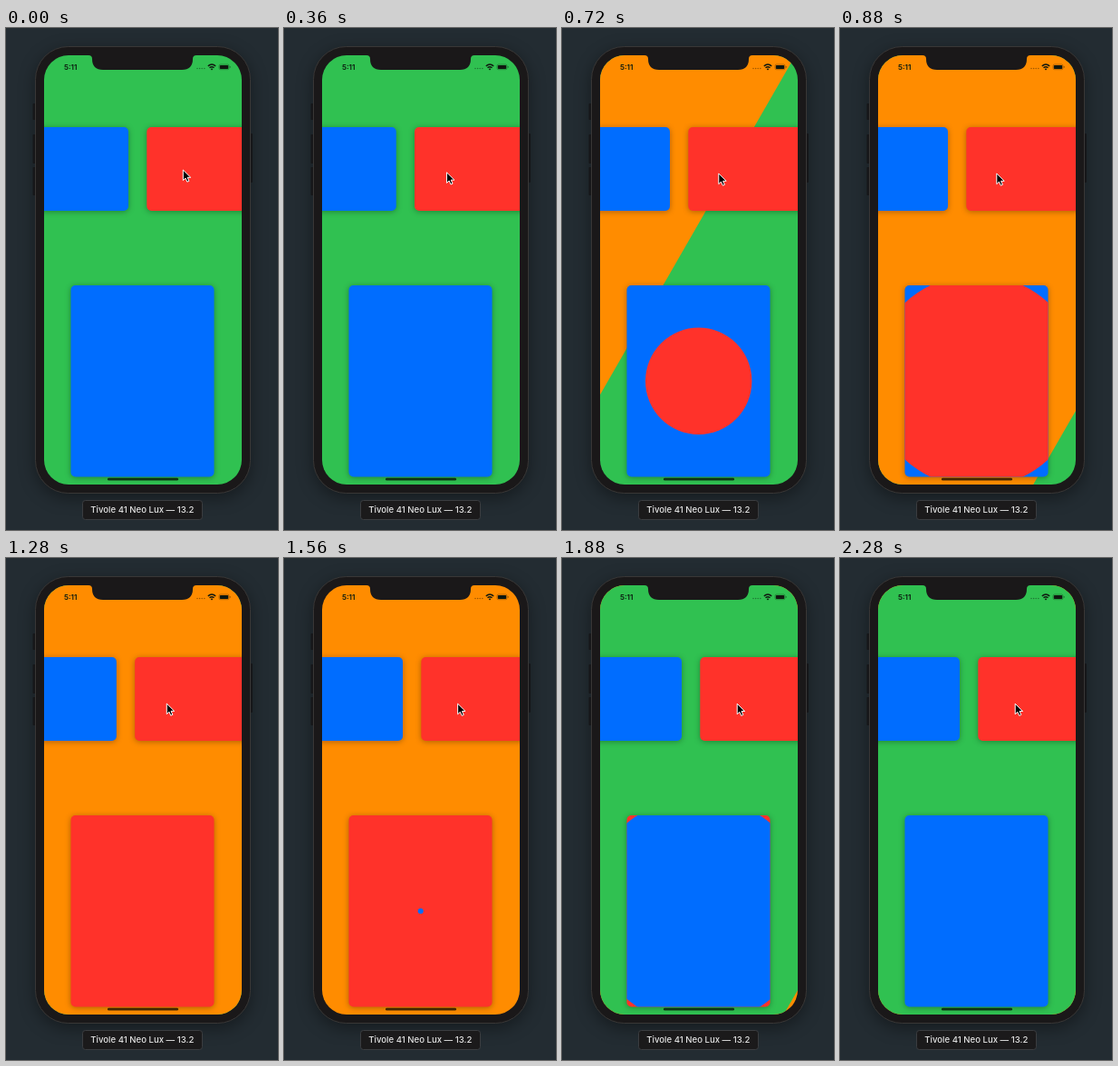
An HTML page that plays this animation: 300 px wide and 552 px high, repeating every 2.32 s.

```html
<!DOCTYPE html>
<html lang="en">
<head>
<meta charset="utf-8">
<title>Card transition</title>
<style>
  html, body { margin: 0; width: 100%; height: 100%; overflow: hidden; background: #232c32; }
  svg { display: block; width: 100%; height: 100%; }
  text { font-family: Inter, "Open Sans", sans-serif; }
  .phone { filter: drop-shadow(0 5px 9px rgba(0, 0, 0, .38)); }
  .card { filter: drop-shadow(0 1px 3px rgba(0, 0, 0, .32)); }
</style>
</head>
<body>
<svg viewBox="0 0 300 552">
  <defs>
    <clipPath id="screen"><rect x="42" y="30" width="218" height="472" rx="27"/></clipPath>
    <clipPath id="panel"><rect x="71.5" y="283" width="158" height="210.5" rx="5"/></clipPath>
  </defs>
  <rect width="300" height="552" fill="#232c32"/>

  <g fill="#1b1c1f">
    <rect x="29.5" y="83" width="5" height="18" rx="1"/>
    <rect x="29.5" y="117" width="5" height="32" rx="1"/>
    <rect x="29.5" y="153" width="5" height="31" rx="1"/>
    <rect x="267" y="116" width="5" height="54" rx="1"/>
  </g>
  <rect class="phone" x="32.5" y="20.5" width="237" height="491" rx="36" fill="#1a1819" stroke="#393736"/>

  <g clip-path="url(#screen)">
    <rect id="back" x="42" y="30" width="218" height="472"/>
    <path id="wipe"/>
    <g id="row">
      <rect class="card" x="-158" y="109" width="158" height="92" rx="5" fill="#006dff"/>
      <rect class="card" x="20.3" y="109" width="158" height="92" rx="5" fill="#ff322a"/>
    </g>
    <rect id="base" class="card" x="71.5" y="283" width="158" height="210.5" rx="5"/>
    <g clip-path="url(#panel)"><circle id="dot" cx="150.7" cy="388.3"/></g>
    <rect x="112" y="494.8" width="78" height="2.7" rx="1.35" fill="#000" fill-opacity=".7"/>

    <path d="M91 29V30Q95 30 95 34Q95 46 107 46H194Q206 46 206 34Q206 30 210 30V29Z" fill="#1a1819"/>
    <text x="64" y="45.6" font-size="8.2" font-weight="600" fill="#0b1a0e">5:11</text>
    <g fill="#000" fill-opacity=".4">
      <circle cx="211" cy="44.5" r=".75"/><circle cx="213.6" cy="44.5" r=".75"/>
      <circle cx="216.2" cy="44.5" r=".75"/><circle cx="218.8" cy="44.5" r=".75"/>
    </g>
    <g fill="none" stroke="#101810" stroke-width="1.4">
      <path d="M222.8 41.9Q227 38.2 231.2 41.9"/>
      <path d="M224.5 43.7Q227 41.7 229.5 43.7"/>
    </g>
    <path d="M225.6 45L227 46.5L228.4 45Q227 44 225.6 45Z" fill="#101810"/>
    <rect x="235" y="40.1" width="11" height="5.6" rx="1.6" fill="none" stroke="#000" stroke-opacity=".45" stroke-width=".6"/>
    <rect x="235.8" y="40.9" width="9.4" height="4" rx=".9" fill="#101810"/>
    <rect x="246.8" y="42" width=".8" height="1.8" rx=".4" fill="#000" fill-opacity=".45"/>
  </g>

  <path id="cursor" d="M0 0V11.6L2.7 9.1L4.5 13.2L6.6 12.3L4.8 8.3H8.4Z" fill="#000" stroke="#fff" stroke-width="1" stroke-linejoin="round"/>

  <rect x="84.5" y="519.5" width="132" height="21" rx="3" fill="#1b1a1b" stroke="#3b3d40"/>
  <text x="150.3" y="533.4" font-size="9.6" font-weight="500" fill="#e4e4e4" text-anchor="middle">Tivole 41 Neo Lux — 13.2</text>
</svg>
<script>
const LOOP = 2320, STEP = 40;
const GREEN = '#30c151', ORANGE = '#ff8c00', BLUE = '#006dff', RED = '#ff322a';
// [ms, circle radius]
const TO_RED = [[520, 0], [560, 3], [600, 13], [640, 28], [720, 58.7], [800, 89], [880, 117], [920, 129], [960, 134]];
const TO_BLUE = [[1520, 0], [1560, 3], [1600, 15], [1640, 33], [1720, 66], [1800, 97], [1880, 125], [1920, 134]];

const el = id => document.getElementById(id);
const mix = (a, b, k) => a + (b - a) * k;

function smooth(t, from, to) {
  const u = Math.min(1, Math.max(0, (t - from) / (to - from)));
  return u * u * (3 - 2 * u);
}

function track(points, t) {
  const i = points.findIndex(p => p[0] > t);
  if (i === 0) return points[0][1];
  if (i < 0) return points[points.length - 1][1];
  const [t0, a] = points[i - 1], [t1, b] = points[i];
  return mix(a, b, (t - t0) / (t1 - t0));
}

function draw(ms) {
  const t = Math.floor((ms % LOOP) / STEP) * STEP;
  const back = smooth(t, 1120, 1650), out = smooth(t, 40, 540);
  const follow = (a, b, c) => mix(mix(a, b, out), c, back);

  el('row').setAttribute('transform', `translate(${follow(135, 119, 132)} 0)`);
  el('cursor').setAttribute('transform', `translate(${follow(195.3, 172.8, 193.2)} ${follow(156, 160, 160.2)})`);

  const second = t >= 1520;
  const r = track(second ? TO_BLUE : TO_RED, t);
  const edge = r > 0 ? 78 + 6.78 * r : 0;
  el('back').setAttribute('fill', second ? ORANGE : GREEN);
  el('wipe').setAttribute('fill', second ? GREEN : ORANGE);
  el('wipe').setAttribute('d', `M0 0H${edge / Math.sqrt(3)}L0 ${edge}Z`);
  // a fully grown circle becomes the card itself
  const done = r >= 134;
  el('base').setAttribute('fill', second !== done ? RED : BLUE);
  el('dot').setAttribute('fill', second ? BLUE : RED);
  el('dot').setAttribute('r', done ? 0 : r);
}

const start = performance.now();
function tick() {
  draw(performance.now() - start);
  requestAnimationFrame(tick);
}
tick();
</script>
</body>
</html>
```
